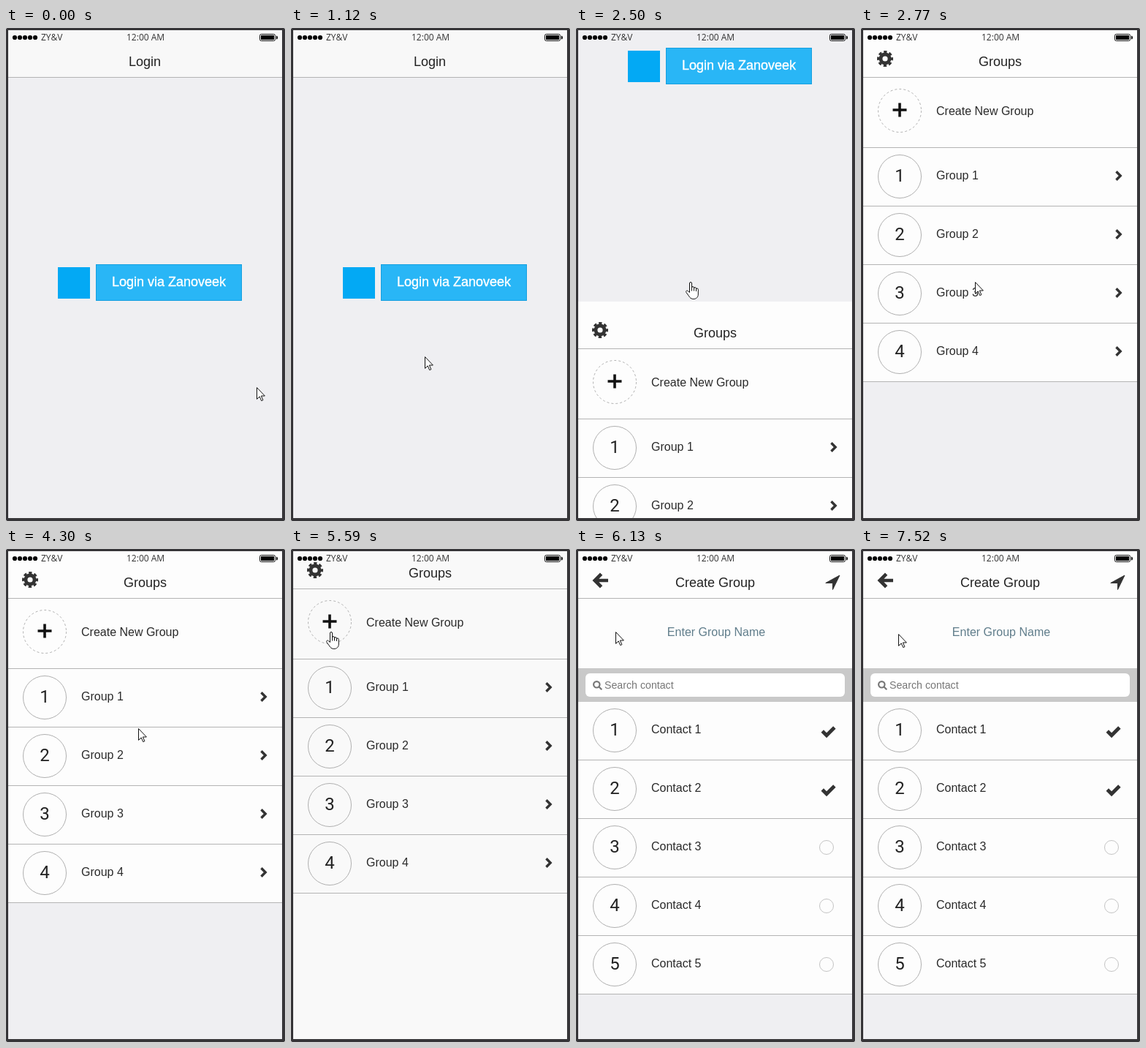
These frames come from a looping animation (382x674 px, 8 s). An HTML page:

```html
<!DOCTYPE html>
<html lang="en">
<head>
<meta charset="utf-8">
<title>App prototype</title>
<style>
  html, body { margin: 0; width: 100%; height: 100%; overflow: hidden; background: #fff; }
  svg { display: block; width: 100vw; height: 100vh; --paper: #fdfdfd; --ground: #efeff2;
        font-family: "Liberation Sans", Arial, sans-serif; }
  svg.flat { --paper: #f9f9f9; --ground: #f9f9f9; }
  .paper { fill: var(--paper); }
  .ground { fill: var(--ground); }
  .rule { stroke: #b4b4b4; }
  .ring { fill: none; stroke: #b0b0b0; }
  .icon { fill: none; stroke: #333; }
  .title { font-size: 18px; text-anchor: middle; fill: #222; }
  .label { font-size: 16px; fill: #2a2a2a; }
  .digit { font: 24px Roboto, sans-serif; text-anchor: middle; fill: #222; }
  .status { font: 12px "Open Sans", "Noto Sans", sans-serif; fill: #333; }
  .cursor { fill: #fff; stroke: #111; stroke-linejoin: round; }
</style>
</head>
<body>
<svg id="stage" viewBox="0 0 382 674" preserveAspectRatio="none">
  <defs><clipPath id="screen"><rect x="3" y="3" width="375" height="667"/></clipPath></defs>
  <rect width="382" height="674" rx="2" fill="#363538"/>
  <g clip-path="url(#screen)">
    <g id="pages"></g>
    <g id="bar"></g>
  </g>
  <path id="arrow" class="cursor" d="M.5.6V16.4L4.2 12.9 6.7 18.6 8.9 17.7 6.4 12H11.4Z"/>
  <g id="hand" class="cursor">
    <path d="M5.5 14.5V2a1.5 1.5 0 0 1 3 0V8a1.5 1.5 0 0 1 3 .2V9a1.5 1.5 0 0 1 3 .3v.9a1.4 1.4 0 0 1 2.8.5V17c0 4-2.6 6.5-6.5 6.5-3.2 0-5-1.8-6.4-4.3L1 14.6c-1.2-2 .9-3.4 2.4-1.9z"/>
    <path d="M8.5 8v4.5M11.5 9v3.5M14.5 10v3" fill="none"/>
  </g>
</svg>
<script>
const LOOP = 8000, PAGE = 667, ROW = 80;
const el = id => document.getElementById(id);

// Drawing helpers
const text = (cls, x, y, s, style = '') => `<text class="${cls}" x="${x}" y="${y}" style="${style}">${s}</text>`;
const icon = (d, w) => `<path class="icon" d="${d}" stroke-width="${w}"/>`;
const rule = y => `<path class="rule" d="M3 ${y + .5}H378"/>`;
const block = (cls, bottom) => `<rect class="${cls}" x="3" y="3" width="375" height="${bottom - 3}"/>`;
const repeat = (n, fn) => Array.from({ length: n }, (_, i) => fn(i)).join('');

const chevron = y => icon(`M349.5 ${y - 6.7}l5.7 5.7-5.7 5.7`, 3.4);
const check = y => icon(`M337.3 ${y + 1}l5.8 5.8 10.8-10.8`, 4.9);
const radio = y => `<circle class="ring" style="stroke:#c4c4c4" cx="343" cy="${y}" r="9.5"/>`;

const rows = (n, top, name, mark) => repeat(n, i => {
  const y = top + ROW * i;
  return `<circle class="ring" cx="53" cy="${y + 40}" r="29.5"/>` +
    text('digit', 53, y + 47, i + 1) + text('label', 103, y + 44, `${name} ${i + 1}`) +
    mark(i)(y + 40) + rule(y + ROW);
});

const gear =
  `<circle class="icon" cx="33" cy="42" r="6" stroke-width="4.8"/>` +
  `<circle class="icon" cx="33" cy="42" r="9.4" stroke-width="3.2" stroke-dasharray="4.3 3.083" stroke-dashoffset="2.15"/>`;

const login = block('ground', 670) +
  `<rect x="3" y="3" width="375" height="64" fill="#f8f8f8"/>` + rule(67) +
  text('title', 190, 52, 'Login') +
  `<rect x="71" y="327" width="44" height="43" fill="#03a9f4"/>` +
  `<rect x="123.5" y="323.5" width="199" height="49" fill="#29b6f6" stroke="#159fdf"/>` +
  text('title', 223, 353, 'Login via Zanoveek', 'fill:#fff;stroke:#fff;stroke-width:.4');

const groups = block('ground', 670) + block('paper', 484) + gear +
  text('title', 190.5, 52, 'Groups') + rule(67) +
  `<circle class="ring" cx="53" cy="113" r="29.5" stroke-dasharray="3 3"/>` +
  `<path d="M43.5 112H62.5M53 102.5V121.5" stroke="#111" stroke-width="3.6"/>` +
  text('label', 103, 119, 'Create New Group') + rule(163) +
  rows(4, 163, 'Group', () => chevron);

const create = block('ground', 670) + block('paper', 609) +
  icon('M34.6 34.2 25.8 43l8.8 8.8M27 43H44', 4.7) +
  text('title', 190.5, 52, 'Create Group') +
  `<path d="M361 36 351.5 55.5V46.5H341.8Z" fill="#333" stroke="#333" stroke-linejoin="round"/>` + rule(67) +
  text('label', 192, 119, 'Enter Group Name', 'fill:#607d8b;text-anchor:middle') +
  `<rect x="3" y="163" width="375" height="46" fill="#c9c9c9"/>` +
  `<rect x="13" y="170" width="355" height="32" rx="6" fill="#fff"/>` +
  `<g fill="none" stroke="#777" stroke-width="2.2"><circle cx="28.3" cy="185.3" r="4.2"/><path d="M31.3 188.3 35.3 192.3"/></g>` +
  text('label', 39, 191, 'Search contact', 'font-size:14.2px;fill:#777') +
  rows(5, 208, 'Contact', i => i < 2 ? check : radio);

el('pages').innerHTML = [login, groups, create]
  .map((page, i) => `<g transform="translate(0 ${i * PAGE})">${page}</g>`).join('');

el('bar').innerHTML =
  repeat(5, i => `<circle cx="${12 + 7 * i}" cy="13" r="3.1"/>`) +
  text('status', 48, 17, 'ZY&amp;V') + text('status', 165, 17, '12:00 AM') +
  `<rect x="347.5" y="8.5" width="21" height="9" rx="2" fill="none" stroke="#111"/>` +
  `<rect x="349" y="10" width="18" height="6"/><path d="M370 10.5q2 0 2 2.5t-2 2.5z"/>`;

function beat(ms) {
  const pair = Math.floor(ms / 270) * 270;
  return pair + (ms - pair >= 150 ? 150 : 0);
}
const clamp = u => Math.min(1, Math.max(0, u));
const smooth = u => (1 - Math.cos(Math.PI * u)) / 2;
const easeOut = u => 1 - (1 - u) ** 3;

// A page push begins `lead` ms after its first beat.
const push = (t, start, lead) => t < start ? 0 : smooth(clamp((beat(t - start) - lead) / 486));

// Cursor strokes: quadratic curves, each from the end of the one before.
const strokes = [
  { start: 0, ms: 690, via: [287, 475], to: [231, 452], ease: smooth },
  { start: 970, ms: 540, via: [82, 452], to: [82, 355], ease: smooth },
  { start: 1540, ms: 540, via: [112, 347], to: [156, 347], ease: smooth },
  { start: 4150, ms: 810, via: [250, 240], to: [54, 113], ease: easeOut },
  { start: 6830, ms: 690, via: [53, 114], to: [51, 116], ease: smooth }
];
strokes.forEach((s, i) => s.from = i ? strokes[i - 1].to : [343, 491]);

function cursorAt(t) {
  const { start, ms, from, via, to, ease } = strokes.findLast(s => s.start <= t);
  const s = ease(clamp(beat(t - start) / ms)), r = 1 - s;
  return from.map((a, i) => Math.round(r * r * a + 2 * r * s * via[i] + s * s * to[i]));
}

// Clickable area of each page
const hot = [
  (x, y) => x > 123 && x < 323 && y > 323 && y < 373,
  (x, y) => Math.hypot(x - 53, y - 113) < 30,
  () => false
];

function draw(t) {
  const [x, y] = cursorAt(t);
  const progress = push(t, 2350, -75.6) + push(t, 5440, 106.4);
  const scroll = Math.round(progress * PAGE * 2) / 2;
  const hand = hot[Math.floor(progress)](x, y);
  el('pages').setAttribute('transform', `translate(0 ${-scroll})`);
  el('stage').classList.toggle('flat', progress > 1 && progress < 1.1);
  el('arrow').setAttribute('transform', `translate(${x} ${y})`);
  el('hand').setAttribute('transform', `translate(${x - 6} ${y})`);
  el('arrow').style.display = hand ? 'none' : '';
  el('hand').style.display = hand ? '' : 'none';
}

const begin = performance.now();
function tick() {
  draw((performance.now() - begin) % LOOP);
  requestAnimationFrame(tick);
}
tick();
</script>
</body>
</html>
```
